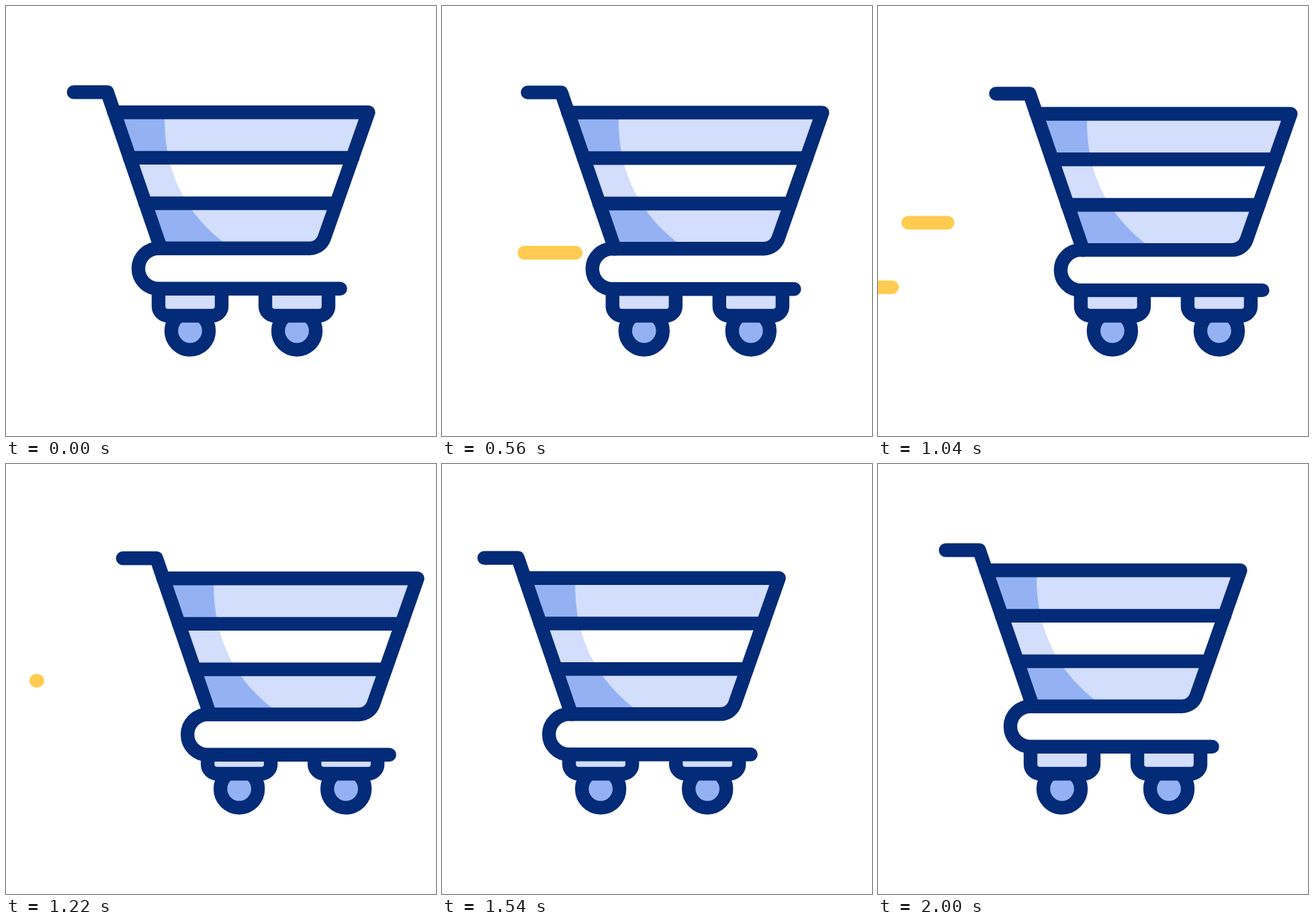
These frames come from a looping animation (640 px wide and 640 px high, 2.16 s). An HTML page:

```html
<!DOCTYPE html>
<html lang="en">
<head>
<meta charset="utf-8">
<title>Shopping cart</title>
<style>
  html, body { margin: 0; width: 100%; height: 100%; overflow: hidden; background: #fff; }
  svg { display: block; width: 100vw; height: 100vh; }
  .line { fill: none; stroke: #032b77; stroke-width: 20.4; stroke-linecap: round; stroke-linejoin: round; }
  .streak { stroke: #ffcb50; stroke-width: 20.4; stroke-linecap: round; }
  .light { fill: #d3ddfc; }
  .mid { fill: #94b2f3; }
  .bracket { fill: #d3ddfc; stroke-linecap: butt; }
  .wheel { fill: #94b2f3; }
</style>
</head>
<body>
<svg viewBox="0 0 640 640">
  <defs>
    <clipPath id="top"><rect x="150" y="158" width="400" height="68"/></clipPath>
    <clipPath id="middle"><rect x="150" y="226" width="400" height="67.5"/></clipPath>
    <clipPath id="bottom"><rect x="150" y="293.5" width="400" height="67.5"/></clipPath>
    <path id="basket" d="M160.7 158.2H539.4L473.7 345.4A23 23 0 0 1 452 360.8H230.4Z"/>
    <path id="shade" d="M160.7 158.2H236.3C233 240 264 312 336.5 360.8H230.4Z"/>
  </defs>

  <g id="streaks"></g>

  <g id="cart">
    <circle class="line wheel" cx="274" cy="483.6" r="28"/>
    <circle class="line wheel" cx="433" cy="483.6" r="28"/>
    <path class="line bracket"/>
    <path class="line bracket" transform="translate(159 0)"/>
    <g id="body">
      <g clip-path="url(#top)"><use href="#basket" class="light"/><use href="#shade" class="mid"/></g>
      <g clip-path="url(#middle)"><use href="#shade" class="light"/></g>
      <g clip-path="url(#bottom)"><use href="#basket" class="light"/><use href="#shade" class="mid"/></g>
      <path class="line" d="M100.7 128.2H150.7L230.4 360.8"/>
      <path class="line" d="M160.7 158.2H539.4L473.7 345.4A23 23 0 0 1 452 360.8H227A30 30 0 0 0 227 420.8H497.5"/>
      <path class="line" d="M184 225.9H516M207 293.6H492"/>
    </g>
  </g>
</svg>

<script>
const LOOP = 2160;

// The cart rolls ahead, rushes back past its place, then settles
const travel = [
  { start: 185, end: 1185, from: 0, to: 76.3, handles: [0.49, 0.35] },
  { start: 1185, end: 1485, from: 76.3, to: -38.3, handles: [0.42, 0.64] },
  { start: 1485, end: 1985, from: -38.3, to: 0, handles: [0.65, 0.18] }
];
const bounce = { start: 185, period: 400, count: 4, depth: 13 };

// Both tips of a streak run the same way; the tail leaves later than the head
const streaks = [
  { y: 322.6, from: 146, to: 45, head: [665, 1035], tail: [983, 1273] },
  { y: 367.3, from: 199, to: 45, head: [420, 1019], tail: [734, 1034] },
  { y: 418.6, from: 146, to: -24, head: [560, 1148], tail: [750, 1492] }
];
const streakHandles = [0.15, 0.15];

const $ = s => document.querySelector(s);
const cart = $('#cart'), body = $('#body');
const brackets = document.querySelectorAll('.bracket');

for (const s of streaks) {
  s.el = document.createElementNS('http://www.w3.org/2000/svg', 'line');
  s.el.setAttribute('class', 'streak');
  s.el.setAttribute('y1', s.y);
  s.el.setAttribute('y2', s.y);
  $('#streaks').append(s.el);
}

// Cubic Bezier easing with handles (a, 0) and (b, 1)
function ease(u, [a, b]) {
  let lo = 0, hi = 1, s = 0.5;
  for (let i = 0; i < 24; i++) {
    s = (lo + hi) / 2;
    const r = 1 - s;
    const x = 3 * r * r * s * a + 3 * r * s * s * b + s * s * s;
    if (x < u) lo = s; else hi = s;
  }
  return s * s * (3 - 2 * s);
}

function glide(t, start, end, from, to, handles) {
  const u = Math.min(1, Math.max(0, (t - start) / (end - start)));
  return from + (to - from) * ease(u, handles);
}

function cartX(t) {
  const leg = travel.find(l => t < l.end);
  return leg ? glide(t, leg.start, leg.end, leg.from, leg.to, leg.handles) : 0;
}

function bodyY(t) {
  const turns = (t - bounce.start) / bounce.period;
  if (turns < 0 || turns > bounce.count) return 0;
  return bounce.depth * Math.sin(Math.PI * turns) ** 2;
}

function draw(t) {
  const y = bodyY(t);
  cart.setAttribute('transform', `translate(${cartX(t)} 0)`);
  body.setAttribute('transform', `translate(0 ${y})`);
  const d = `M227 ${420.8 + y}V447A14 14 0 0 0 241 461H307A14 14 0 0 0 321 447V${420.8 + y}`;
  brackets.forEach(b => b.setAttribute('d', d));

  for (const { el, from, to, head, tail } of streaks) {
    const [left, right] = [head, tail].map(span => glide(t, ...span, from, to, streakHandles));
    el.setAttribute('x1', left);
    el.setAttribute('x2', right);
    el.setAttribute('visibility', right - left > 0.5 ? 'visible' : 'hidden');
  }
}

const begin = performance.now();
function tick() {
  draw((performance.now() - begin) % LOOP);
  requestAnimationFrame(tick);
}
draw(0);
requestAnimationFrame(tick);
</script>
</body>
</html>
```
